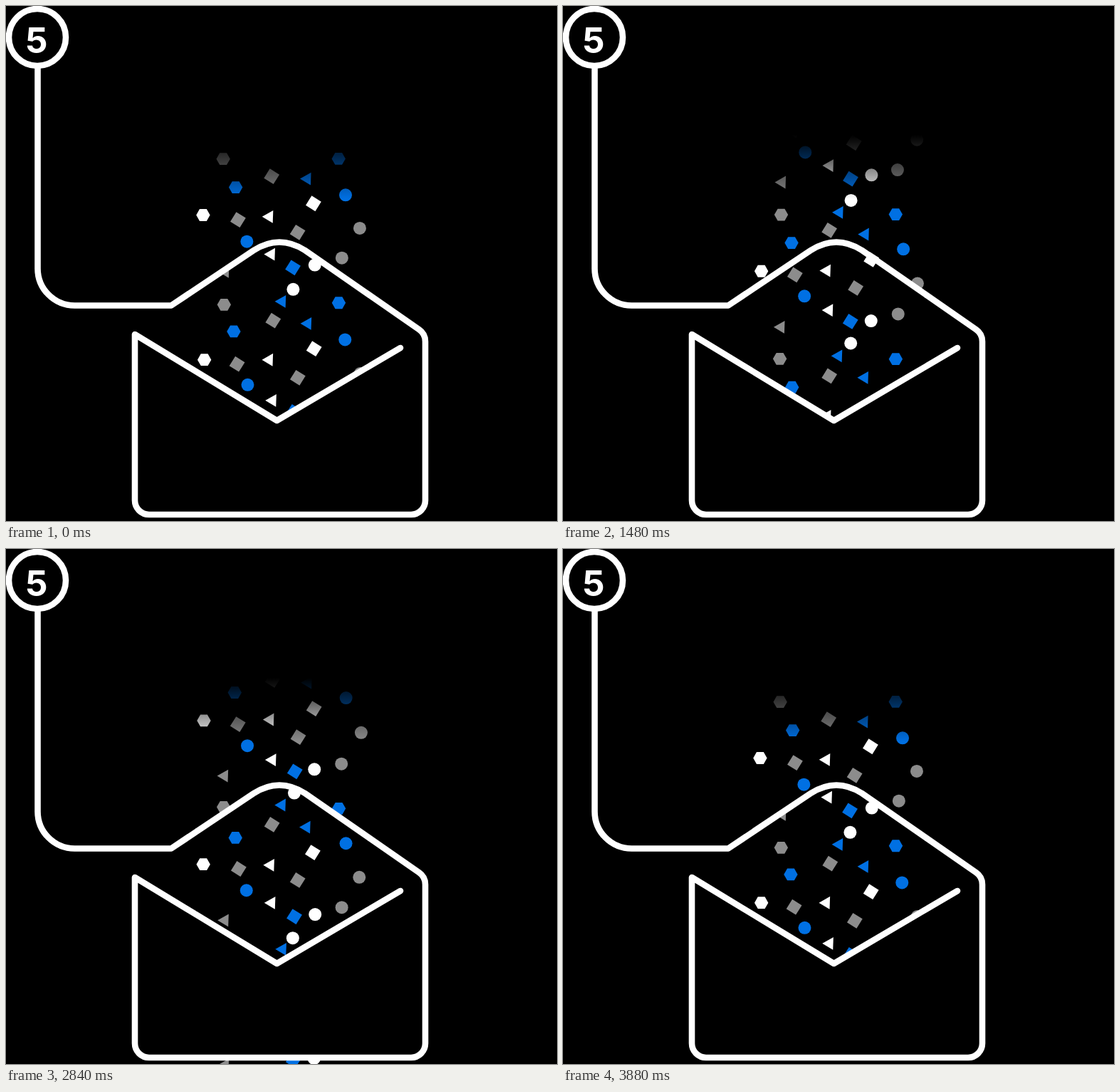
Recreate the animation shown at these times as an HTML page. Size 774 by 723 pixels, loop 3920 ms.

```html
<!DOCTYPE html>
<html lang="en">
<head>
<meta charset="utf-8">
<title>Envelope</title>
<style>
  html, body { margin: 0; width: 100%; height: 100%; overflow: hidden; background: #000; }
  svg { display: block; }
  text { font: 700 50px Inter, sans-serif; fill: #fff; text-anchor: middle; }
  .line { fill: none; stroke: #fff; stroke-width: 8.6; stroke-linecap: round; stroke-linejoin: round; }
</style>
</head>
<body>
<svg width="774" height="723" viewBox="0 0 774 723">
  <defs>
    <circle id="dot" r="9"/>
    <path id="hex" d="M-9.7 0L-4.9 -8.4H4.9L9.7 0L4.9 8.4H-4.9Z"/>
    <rect id="box" x="-7.9" y="-7.9" width="15.8" height="15.8" transform="rotate(32)"/>
    <path id="tri" d="M-8 0L7.6 -8.8L7 9Z"/>
    <linearGradient id="fade" gradientUnits="userSpaceOnUse" x1="0" y1="181" x2="0" y2="271">
      <stop offset="0"/>
      <stop offset="1" stop-opacity="0"/>
    </linearGradient>
  </defs>
  <g id="confetti"></g>
  <rect x="240" width="300" height="272" fill="url(#fade)"/>
  <path d="M181 461L380.5 582L554 480L589 459V714H181Z"/>
  <circle class="line" cx="44" cy="44" r="40"/>
  <text x="43" y="65.5">5</text>
  <path class="line" d="M44.5 86V368A52 52 0 0 0 96.5 420.5H232L348 343Q384 320 420 343L580 454Q589 460 589 471V694A20 20 0 0 1 569 714H201A20 20 0 0 1 181 694V461L380.5 582L554 480"/>
</svg>
<script>
  const STEP = 40, FRAMES = 98, CYCLE = 97, PITCH = 203;
  const WHITE = '#fff', GREY = '#8c8c8c', BLUE = '#0070e3';

  // shape, colour, x, y within one sheet of confetti
  const sheet = [
    ['hex', GREY, 306, 215.2], ['hex', BLUE, 467.6, 214.7],
    ['box', GREY, 374.4, 238.6], ['tri', BLUE, 421.3, 242.4],
    ['hex', BLUE, 321.4, 255.4], ['dot', BLUE, 477.2, 264.6],
    ['box', WHITE, 432, 278.2], ['hex', WHITE, 277.8, 294.1],
    ['tri', WHITE, 368, 294.7], ['box', GREY, 325.9, 300.2],
    ['dot', GREY, 497.5, 312.7], ['box', GREY, 409.9, 317.8],
    ['dot', BLUE, 338.8, 330.2], ['tri', WHITE, 371.3, 349.3],
    ['dot', GREY, 471.3, 354.9], ['dot', WHITE, 433.5, 364],
    ['box', BLUE, 404.4, 367], ['tri', GREY, 305, 372.8],
    ['dot', WHITE, 404, 397.2], ['tri', BLUE, 385.3, 414.2]
  ];

  let seed = 11;
  const random = () => (seed = seed * 16807 % 2147483647) / 2147483647;

  // Slow irregular drift around zero
  function drift() {
    const a = random() * 6.28, b = random() * 6.28;
    const u = 2.2 + random(), v = 3.6 + random();
    return s => 0.9 * Math.sin(u * s + a) + 0.6 * Math.sin(v * s + b);
  }

  const root = document.getElementById('confetti');
  const make = name => document.createElementNS('http://www.w3.org/2000/svg', name);

  const layers = [0, 1, 2].map(() => root.appendChild(make('g')));
  const bits = sheet.map(([shape, color, x, y]) => ({
    x, y, dx: drift(), dy: drift(),
    nodes: layers.map(layer => {
      const node = layer.appendChild(make('use'));
      node.setAttribute('href', '#' + shape);
      node.setAttribute('fill', color);
      return node;
    })
  }));

  function draw(now) {
    const frame = Math.floor(now / STEP) % FRAMES % CYCLE;
    // The incoming sheet pops in one step after the loop point
    layers[0].setAttribute('visibility', frame ? 'visible' : 'hidden');
    for (const bit of bits) {
      bit.nodes.forEach((node, k) => {
        const age = frame + k * CYCLE, s = age * STEP / 1000;
        const x = bit.x + bit.dx(s);
        const y = bit.y + PITCH * (age / CYCLE - 1) + bit.dy(s);
        node.setAttribute('transform', `translate(${x.toFixed(2)} ${y.toFixed(2)})`);
      });
    }
  }

  const start = performance.now();
  function tick() {
    draw(performance.now() - start);
    requestAnimationFrame(tick);
  }
  tick();
</script>
</body>
</html>
```
